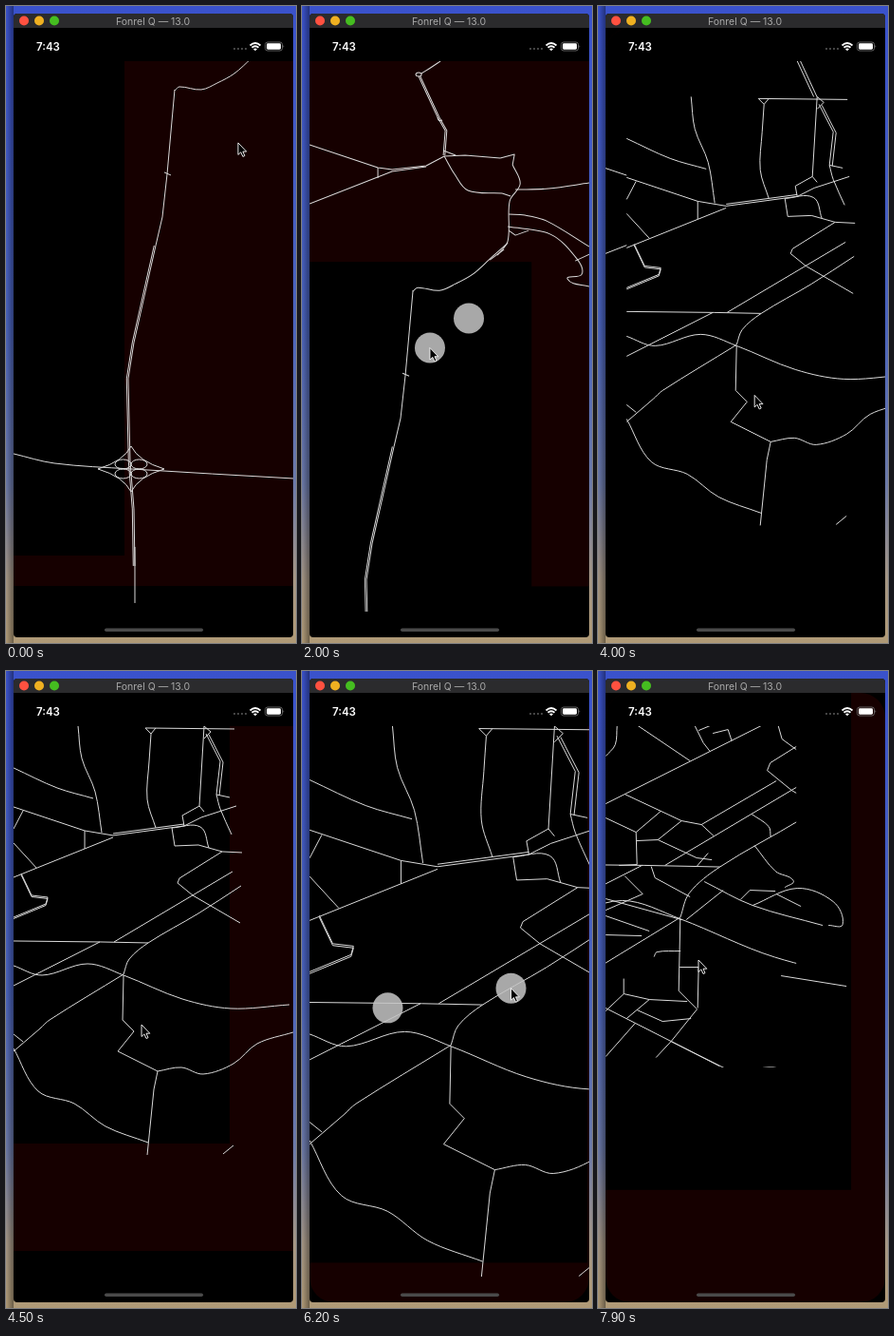
Animation, 306 px wide and 670 px high, one loop 8000 ms. Source, as an HTML page:

```html
<!DOCTYPE html>
<html lang="en">
<head>
<meta charset="utf-8">
<style>
  html, body { margin: 0; width: 100%; height: 100%; overflow: hidden; background: #000; }
  svg { display: block; width: 306px; height: 670px; }
  #world path { fill: none; stroke: #dadada; stroke-width: 1; vector-effect: non-scaling-stroke; stroke-linejoin: round; }
  text { font-family: Inter, Roboto, sans-serif; }
</style>
</head>
<body>
<svg viewBox="0 0 306 670">
  <defs>
    <linearGradient id="desk" x2="0" y2="1">
      <stop offset="0" stop-color="#3a52cc"/>
      <stop offset=".5" stop-color="#4a63bc"/>
      <stop offset=".75" stop-color="#6b79a8"/>
      <stop offset=".9" stop-color="#a59684"/>
      <stop offset="1" stop-color="#b09a76"/>
    </linearGradient>
    <linearGradient id="shade">
      <stop offset="0" stop-opacity="0"/>
      <stop offset="1" stop-opacity=".4"/>
    </linearGradient>
    <clipPath id="screen"><rect x="8" y="23" width="295" height="641" rx="26"/></clipPath>
    <clipPath id="map"><rect x="8" y="58" width="295" height="579"/></clipPath>
    <clipPath id="aroundMid"><path d="M-2000-2000H2000V58H8V2000H-2000z"/></clipPath>
    <clipPath id="nearTiles"><path d="M-2000-2000H200V417H-2000z"/></clipPath>
  </defs>

  <rect width="306" height="670" fill="url(#desk)"/>
  <rect width="8" height="670" fill="url(#shade)"/>
  <rect x="8" y="8" width="295" height="656" rx="4"/>
  <path d="M8 23V12q0-4 4-4H299q4 0 4 4V23z" fill="#2b2b2d"/>
  <circle cx="19" cy="15.5" r="5" fill="#ff5140"/>
  <circle cx="35" cy="15.5" r="5" fill="#efb021"/>
  <circle cx="51" cy="15.5" r="5" fill="#45bd20"/>
  <text x="155" y="19.5" font-size="10.5" fill="#a8a8a8" text-anchor="middle">Fonrel Q — 13.0</text>

  <g clip-path="url(#screen)">
    <rect id="fresh" fill="#160000"/>
    <rect id="known"/>
  </g>
  <g clip-path="url(#map)">
    <g id="world">
      <g id="farBox"><g transform="translate(-74.8 -169.3) scale(1.97)">
        <g id="highway"/><g id="town"/><g id="east"/>
      </g></g>
      <g id="mid"/>
      <g id="near" transform="scale(.6211) translate(113 254)"/>
    </g>
  </g>

  <g fill="#fff">
    <text x="32" y="46.5" font-size="11.5" font-weight="600">7:43</text>
    <path d="M240 45h14" stroke="#444" stroke-width="2" stroke-dasharray="2"/>
    <g fill="none" stroke="#fff" stroke-width="1.8">
      <path d="M257.5 41.5q5.500-5 11 0"/>
      <path d="M259.5 43.7q3.500-3 7 0"/>
    </g>
    <path d="M261 45.2q2-1.500 4 0l-2 2z"/>
    <rect x="273.5" y="38" width="18" height="9" rx="2.5" fill="none" stroke="#777" stroke-width=".8"/>
    <rect x="275" y="39.3" width="15" height="6.4" rx="1.4"/>
    <path d="M292.5 41q1.600 1.500 0 3z" fill="#888"/>
  </g>
  <rect x="104" y="654.5" width="104" height="3.5" rx="1.7" fill="#4a4a4a"/>

  <g id="touches" fill="#c4c4c4" fill-opacity=".86">
    <circle r="16"/><circle r="16"/>
  </g>
  <path id="cursor" d="M0 0V12.5L2.900 9.900 5 14.500 7 13.600 5 9.200H8.800z" fill="#000" stroke="#fff" stroke-width=".9"/>
</svg>

<script>
const LOOP = 8000;
const ORIGIN = [8, 58], FRAME = [295, 552], CENTER = [155.5, 344];
const $ = id => document.getElementById(id);
const set = (el, attrs) => { for (const k in attrs) el.setAttribute(k, attrs[k]); };
const show = (el, on) => { el.style.display = on ? '' : 'none'; };
const clamp = u => Math.min(1, Math.max(0, u));
const mix = (a, b, u) => a.map((v, i) => v + (b[i] - v) * u);

function addPath(parent, d) {
  const el = document.createElementNS('http://www.w3.org/2000/svg', 'path');
  set(el, { d });
  parent.append(el);
}

const straight = (parent, ...lines) => lines.forEach(line => addPath(parent, 'M' + line));

// A smooth road through a few key points.
function smooth(points) {
  const tangent = i => {
    const a = points[Math.max(i - 1, 0)], b = points[Math.min(i + 1, points.length - 1)];
    const length = Math.hypot(b[0] - a[0], b[1] - a[1]);
    return [(b[0] - a[0]) / length, (b[1] - a[1]) / length];
  };
  let d = 'M' + points[0];
  for (let i = 1; i < points.length; i++) {
    const p = points[i - 1], q = points[i], u = tangent(i - 1), v = tangent(i);
    const reach = Math.hypot(q[0] - p[0], q[1] - p[1]) / 3;
    d += `C${p[0] + u[0] * reach} ${p[1] + u[1] * reach} ${q[0] - v[0] * reach} ${q[1] - v[1] * reach} ${q}`;
  }
  return d;
}
const parse = line => line.match(/\S+ \S+/g).map(pair => pair.split(' ').map(Number));
const winding = (parent, ...lines) => lines.forEach(line => addPath(parent, smooth(parse(line))));

// Two carriageways, the second shifted by (dx, dy).
function twin(parent, line, dx, dy) {
  const points = parse(line);
  addPath(parent, 'M' + points.join(' '));
  addPath(parent, 'M' + points.map(([x, y]) => [x + dx, y + dy]).join(' '));
}

// Cloverleaf: one ramp and one loop per quadrant.
function interchange(parent, x, y) {
  for (const sx of [-1, 1]) for (const sy of [-1, 1]) {
    addPath(parent, `M${x + 35 * sx} ${y}Q${x + 8 * sx} ${y + 8 * sy} ${x} ${y + 24 * sy}`);
    addPath(parent, `M${x} ${y + 5 * sy}a8.500 5 0 1 0 ${17 * sx} 0a8.500 5 0 1 0 ${-17 * sx} 0`);
  }
}

const highway = $('highway'), town = $('town'), east = $('east'), mid = $('mid'), near = $('near');

winding(highway, '217 249 198 266 180 282 162 292 145 299 122 296 117 300', '-53 682 -10 692 71 698 242 708');
straight(highway, '117 299 109 388 104 433 97 463', '106 386 113 389', '198 267 213 256', '75 780V839');
twin(highway, '97 463 74 565 68 603 70 690 74 740 75 800', -1.7, 0);
interchange(highway, 71, 698);

winding(town, '146 58 137 64 126 71', '150 158 161 177 175 194 211 197');
twin(town, '123 74 143 117 151 131 149 157', 1.7, 0);
straight(town, '8 146 80 170 95 172 131 168 150 158 172 157 209 160', '8 208 95 174 131 169', '80 170V181',
  '149 152 162 157');
addPath(town, 'M120 72a3 2 0 1 0 6 0a3 2 0 1 0-6 0M143 117q0 5 5 3');

winding(east, '222 167 230 187 219 205 217 247 206 262', '225 193 260 192 303 186',
  '218 219 235 220 258 226 303 253', '217 232 262 240 290 266 295 282 280 287 303 295');
straight(east, '209 160 224 156 222 167', '211 197 220 200', '218 236 225 241 239 236', '288 268 303 261');

// Middle view, north to south
winding(mid, '76 58 80 92 94 127 101 170', '8 102 54 123 92 134', '153 66 151 95 149 135 158 165',
  '222 130 226 145 238 172', '175 165 205 164 214 186');
straight(mid, '8 143 83 168 113 173 188 163 206 154 243 142', '113 171 188 161', '83 168V187',
  '8 217 83 187 113 175', '18 147 8 166', '8 181 32 207', '241 61 147 60 153 66 158 60',
  '209 58 204 142 186 152 188 163', '209 58 216 64 209 71', '204 142 209 148', '222 130 236 133',
  '175 165 178 184 203 183 228 190 249 191');
twin(mid, '211 66 226 95 222 130', 3, 1);

winding(mid, '248 226 203 255 150 286 130 303 124 319',
  '8 310 38 320 86 308 124 320 186 345 237 355 299 351', '124 319 46 367 36 376 8 400',
  '8 397 34 442 72 455 105 479 150 496', '160 421 185 417 208 424 240 413 265 392 303 380');
straight(mid, '228 190 183 218 181 223 197 236 247 265', '239 211 114 285', '8 284 100 285 150 286', '99 285 8 331',
  '8 382 18 390', '124 320 123 367 135 379 118 400 160 421', '149 509 156 440 160 421', '229 508 240 499');
twin(mid, '16 213 27 236 44 238 42 245 8 259', 0, 1.5);

// Street detail of the closest view
winding(near, '20 58 18 78 8 90', '165 184 187 211 206 221 197 228', '162 151 180 164 182 175',
  '112 222 163 247 237 268', '163 247 210 229 248 243 258 267 243 268', '188 235 214 248',
  '87 295 62 296 59 301');
straight(near, '172 58 28 130 8 140', '42 58 97 95', '102 58 111 76 118 85', '106 63 118 58', '121 66 137 62 141 74',
  '190 58 194 72 209 83', '28 130 88 158 109 162 122 174', '188 116 109 162', '8 155 40 170 66 148',
  '40 170 41 204 22 205', '40 179 63 178 104 197 120 199', '63 178 88 158', '104 206 116 192');
straight(near, '56 206 60 218 97 238', '132 231 93 262', '150 241 160 231 187 232', '28 216 47 235 8 252',
  '8 240 88 262', '8 258 54 274', '8 278 46 279', '193 321 262 332', '86 312 106 312 105 355',
  '8 358 27 340 54 346 94 348', '27 340V324', '8 355 77 390 128 416', '54 346 30 366', '8 406 39 371',
  '41 357 68 369 98 366', '77 390 61 407');

const gestures = [
  { start: 500, end: 850, from: [218, 119], to: [157, 330] },
  { start: 2000, end: 3200, from: [135, 359.5], to: [113, 383], zoom: 1.97 },
  { start: 3700, end: 4150, from: [210, 485], to: [143, 372] },
  { start: 5700, end: 6770, from: [206, 336], to: [237, 331], zoom: 1.61 },
  { start: 7300, end: 7750, from: [214, 523], to: [106, 304] }
];
const progress = (g, t) => clamp((t - g.start) / (g.end - g.start));

// Camera: zoom k and the world point shown at ORIGIN.
const FIRST = { k: 1 / 1.97, x: -179.2, y: 360.7 };
const pan = ({ k, x, y }, dx, dy) => ({ k, x: x - dx / k, y: y - dy / k });

function cameraAt(t) {
  return gestures.reduce((cam, g) => {
    const u = progress(g, t);
    if (g.zoom) return { ...cam, k: cam.k * (1 + (g.zoom - 1) * u) };
    return pan(cam, (g.to[0] - g.from[0]) * u, (g.to[1] - g.from[1]) * u);
  }, FIRST);
}

// Glides to each gesture's first point, then follows the gesture.
function pointerAt(t) {
  return gestures.reduce((at, g) => {
    const arrived = mix(at, g.from, clamp((t - g.start + 500) / 300));
    return t < g.start ? arrived : mix(g.from, g.to, progress(g, t));
  }, [245, 144]);
}

// Every load tints the current view except what the load before it covered.
const loads = [0, 900, 3300, 4250];
const views = [pan(FIRST, 178, 32), ...loads.map(cameraAt)];

function placeFrame(el, view, { k, x, y }) {
  set(el, {
    x: ORIGIN[0] + k * (view.x - x), y: ORIGIN[1] + k * (view.y - y),
    width: FRAME[0] * k / view.k, height: FRAME[1] * k / view.k
  });
}

const clipTo = (el, id) => id ? set(el, { 'clip-path': `url(#${id})` }) : el.removeAttribute('clip-path');

function draw(t) {
  const cam = cameraAt(t), { k, x, y } = cam;
  set($('world'), { transform: `translate(${ORIGIN[0] - k * x} ${ORIGIN[1] - k * y}) scale(${k})` });

  const loaded = loads.filter(time => time <= t).length;
  placeFrame($('fresh'), views[loaded], cam);
  placeFrame($('known'), views[loaded - 1], cam);

  const nearLoaded = t >= 6800;
  show(town, loaded > 1);
  show(east, t >= 1400);
  show($('farBox'), loaded < 4);
  show(mid, loaded > 2);
  show(near, nearLoaded);
  clipTo($('farBox'), loaded > 2 && 'aroundMid');
  clipTo(mid, nearLoaded && 'nearTiles');

  const [px, py] = pointerAt(t);
  set($('cursor'), { transform: `translate(${px} ${py})` });
  const [one, two] = $('touches').children;
  set(one, { cx: px, cy: py });
  set(two, { cx: 2 * CENTER[0] - px, cy: 2 * CENTER[1] - py });
  show($('touches'), gestures.some(g => g.zoom && t >= g.start - 200 && t < g.end + 30));
}

const start = performance.now();
function tick() {
  draw((performance.now() - start) % LOOP);
  requestAnimationFrame(tick);
}
tick();
</script>
</body>
</html>
```
